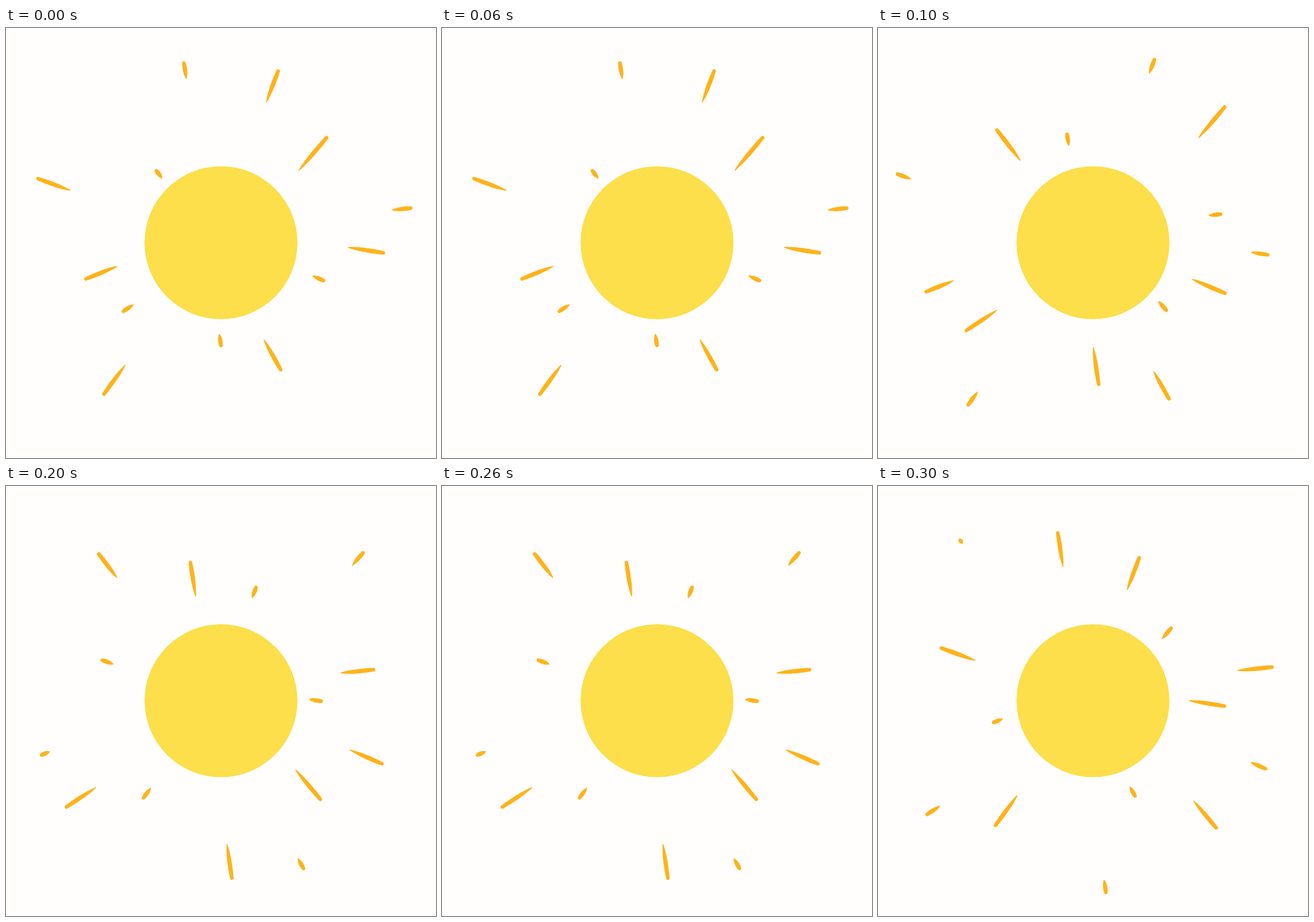
An HTML page with a canvas that plays this animation: 748x748 px, repeating every 400 ms.

```html
<!DOCTYPE html>
<html lang="en">
<head>
<meta charset="utf-8">
<title>Shining sun</title>
<style>
  html, body { margin: 0; width: 100%; height: 100%; overflow: hidden; background: #fffefd; }
  canvas { display: block; width: 100vw; height: 100vh; }
</style>
</head>
<body>
<canvas id="stage" width="748" height="748"></canvas>
<script>
const ctx = document.getElementById('stage').getContext('2d');
const SIZE = 748;
const STEP = 100;
const STEPS = 4;
const CAP = 3.1;    // radius of the outer end
const TIP = 0.8;    // radius of the inner end
const SWELL = 4.3;  // pull of the sides outwards

const mix = (a, b, t) => a + (b - a) * t;

// Each ray runs along a fixed line away from the sun: it leaves the inner
// point at step `first`, travels out and shrinks at the outer point.
// `gap` is the space between one position and the next, as a share of the line.
const rays = [
  { from: [332, 205], to: [309, 58], first: 1, gap: -0.07 },
  { from: [428, 195], to: [482, 52], first: 2, gap: -0.05 },
  { from: [494, 266], to: [623, 114], first: 3, gap: -0.02 },
  { from: [575, 326], to: [707, 313], first: 1, gap: -0.13 },
  { from: [527, 371], to: [681, 395], first: 2, gap: -0.07 },
  { from: [533, 431], to: [677, 493], first: 0, gap: -0.06 },
  { from: [488, 475], to: [607, 617], first: 1, gap: 0, steps: 3 },
  { from: [438, 523], to: [519, 668], first: 3, gap: 0 },
  { from: [371, 532], to: [397, 710], first: 0, gap: 0 },
  { from: [252, 525], to: [155, 658], first: 2, gap: -0.05 },
  { from: [222, 481], to: [83, 573], first: 0, gap: -0.04 },
  { from: [217, 405], to: [59, 469], first: 3, gap: 0.03 },
  { from: [187, 310], to: [31, 253], first: 2, gap: -0.03 },
  { from: [272, 262], to: [141, 92], first: 0, gap: 0.09 },
];

// Start and end of a stroke along its ray, 0 to 1
function span(step, gap) {
  const heads = [0.13 - 0.4 * gap, 0.51, 0.86, 1];
  const tail = step ? heads[step - 1] + gap : 0;
  return [tail, heads[step]];
}

function drawRay({ from: [x0, y0], to: [x1, y1], first, gap, steps = STEPS }, pose) {
  const step = (pose - first + STEPS) % STEPS;
  if (step >= steps) return;
  const [tail, head] = span(step, gap);
  const len = Math.hypot(x1 - x0, y1 - y0) * (head - tail);
  const end = len - CAP;
  const quarter = Math.PI / 2;

  ctx.save();
  ctx.translate(mix(x0, x1, tail), mix(y0, y1, tail));
  ctx.rotate(Math.atan2(y1 - y0, x1 - x0));
  ctx.beginPath();
  ctx.arc(TIP, 0, TIP, quarter, -quarter);
  ctx.bezierCurveTo(len * 0.3, -SWELL, len * 0.65, -SWELL, end, -CAP);
  ctx.arc(end, 0, CAP, -quarter, quarter);
  ctx.bezierCurveTo(len * 0.65, SWELL, len * 0.3, SWELL, TIP, TIP);
  ctx.fill();
  ctx.restore();
}

function draw(time) {
  const pose = Math.floor(time / STEP) % STEPS;
  ctx.fillStyle = '#fffefd';
  ctx.fillRect(0, 0, SIZE, SIZE);
  ctx.fillStyle = '#fcdf4a';
  ctx.beginPath();
  ctx.arc(374, 373.5, 133, 0, 2 * Math.PI);
  ctx.fill();
  ctx.fillStyle = '#ffb31a';
  rays.forEach(ray => drawRay(ray, pose));
}

const start = performance.now();
function tick() {
  draw(performance.now() - start);
  requestAnimationFrame(tick);
}
tick();
</script>
</body>
</html>
```
